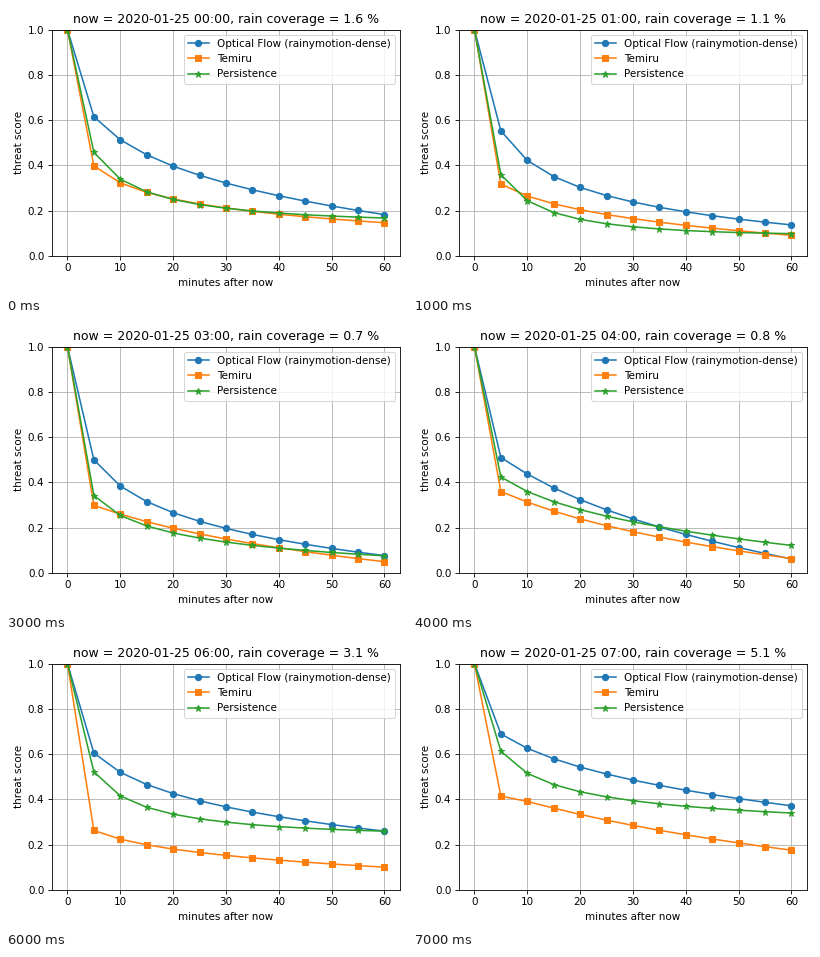
These frames come from a looping animation (401x289 px, 8 s). A matplotlib script:

```python
import matplotlib.pyplot as plt
import numpy as np
from matplotlib.animation import FuncAnimation

W, H, DPI = 401, 289, 75
LEFT, BOTTOM, AX_W, AX_H = 45.6, 38.95, 348.75, 226.5

plt.rcParams.update({"font.family": "DejaVu Sans", "font.size": 10})

MINUTES = np.arange(0, 61, 5)
KEY_MINUTES = [5, 20, 60]

# Key hours: rain coverage, then each curve's score at KEY_MINUTES
KEYS = {
    0: (1.6, (.615, .397, .183), (.398, .252, .147), (.458, .250, .168)),
    2: (0.5, (.490, .209, .092), (.237, .157, .036), (.260, .074, .030)),
    4: (0.8, (.510, .324, .062), (.360, .239, .064), (.424, .280, .122)),
    5: (1.8, (.481, .178, .074), (.168, .089, .041), (.390, .155, .158)),
    6: (3.1, (.605, .426, .260), (.263, .181, .101), (.522, .335, .260)),
    7: (5.1, (.689, .543, .372), (.415, .334, .176), (.613, .434, .340)),
}
STYLES = [
    ("Optical Flow (rainymotion-dense)", "o", "#1f77b4"),
    ("Temiru", "s", "#ff7f0e"),
    ("Persistence", "*", "#2ca02c"),
]


def at_hour(hour):
    """Rain coverage and key scores, linear between the key hours."""
    before = max(h for h in KEYS if h <= hour)
    after = min(h for h in KEYS if h >= hour)
    mix = (hour - before) / max(after - before, 1)
    rain, *curves = [
        (1 - mix) * np.array(a) + mix * np.array(b)
        for a, b in zip(KEYS[before], KEYS[after])
    ]
    return rain, curves


def decay(keys):
    """Start at 1, then follow a parabola in log time through the keys."""
    fit = np.polyfit(np.log(KEY_MINUTES), keys, 2)
    return np.append(1, np.polyval(fit, np.log(MINUTES[1:])))


fig = plt.figure(figsize=(W / DPI, H / DPI), dpi=DPI, facecolor="white")
ax = fig.add_axes([LEFT / W, BOTTOM / H, AX_W / W, AX_H / H])
lines = [
    ax.plot(MINUTES, np.ones(len(MINUTES)), marker=marker, color=color, label=label)[0]
    for label, marker, color in STYLES
]
ax.set(xlim=(-3, 63), ylim=(0, 1), xlabel="minutes after now", ylabel="threat score")
ax.set_xticks(range(0, 61, 10))
ax.set_yticks(np.linspace(0, 1, 6))
ax.grid(True)
ax.legend(loc="upper right")
title = ax.set_title("", pad=6)


def draw(hour):
    rain, curves = at_hour(hour)
    for line, keys in zip(lines, curves):
        line.set_ydata(decay(keys))
    title.set_text(f"now = 2020-01-25 {hour:02d}:00, rain coverage = {rain:.1f} %")
    return [*lines, title]


anim = FuncAnimation(fig, draw, frames=8, interval=1000, repeat=True, blit=False)
plt.show()
```
